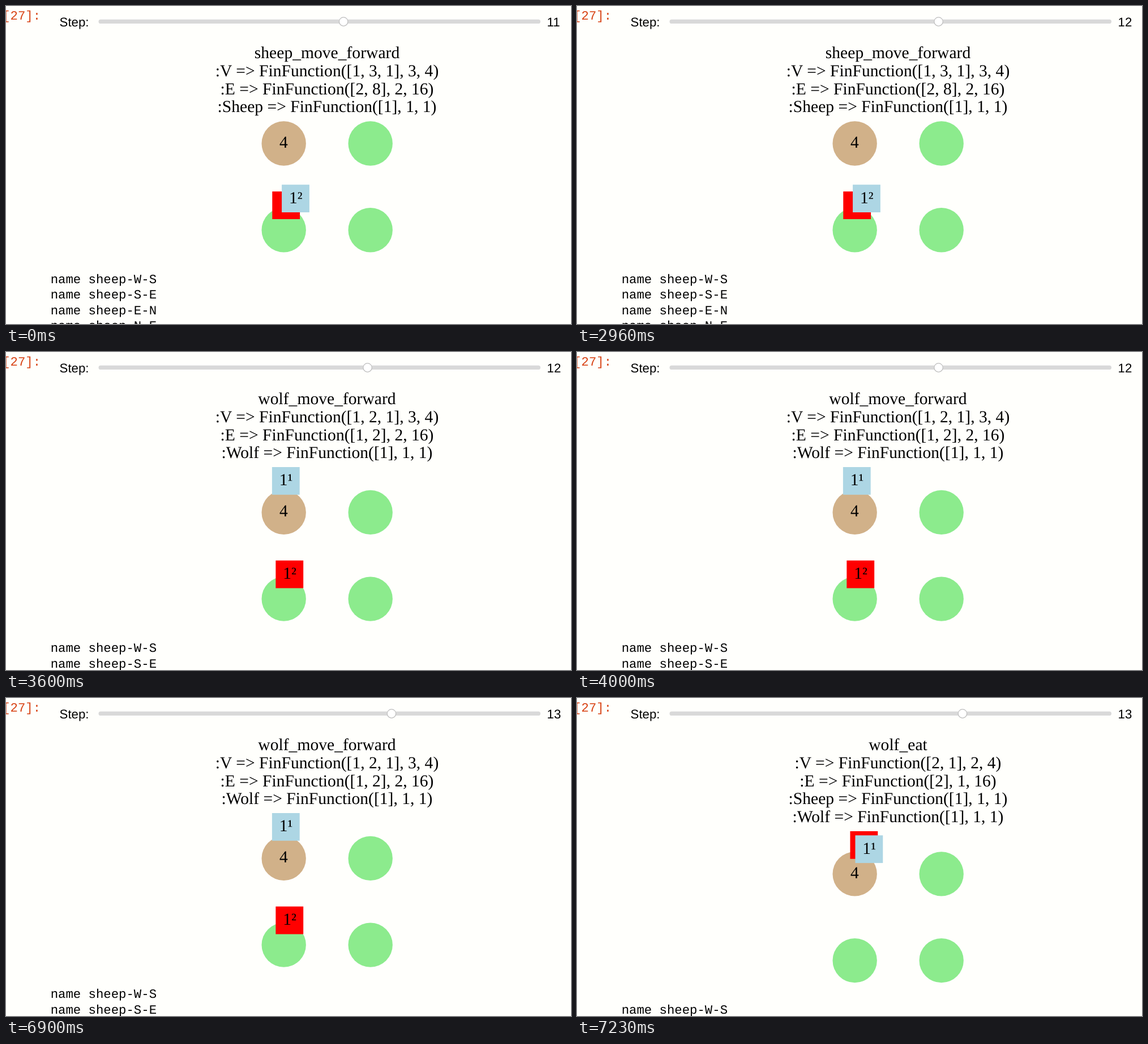
Recreate the animation shown at these times as an HTML page. Size 998x561 px, loop 8000 ms.

```html
<!DOCTYPE html>
<html lang="en">
<head>
<meta charset="utf-8">
<title>Step slider</title>
<style>
  html, body { margin: 0; width: 100%; height: 100%; overflow: hidden; background: #fffffc; }
  svg { display: block; width: 998px; height: 561px; }
  text { white-space: pre; text-rendering: geometricPrecision; }
  .sans { font: 22.2px "Liberation Sans", Arial, sans-serif; }
  .serif { font: 29.6px "Liberation Serif", Times, serif; text-anchor: middle; }
  .mono { font: 22.3px "Liberation Mono", Courier, monospace; }
</style>
</head>
<body>
<svg id="stage" viewBox="0 0 998 561"></svg>
<script>
const LOOP = 8000;
const COLORS = { grass: "#8ceb8d", soil: "#d1b189", wolf: "#ff0000", sheep: "#add6e4", ink: "#000" };
const LOG = ["W-S", "S-E", "E-N", "N-E"];
const stage = document.getElementById("stage");

function add(parent, tag, attrs) {
  const node = document.createElementNS("http://www.w3.org/2000/svg", tag);
  for (const key in attrs) node.setAttribute(key, attrs[key]);
  return parent.appendChild(node);
}

function label(parent, kind, x, y, str, fill = COLORS.ink) {
  const node = add(parent, "text", { class: kind, x, y, fill });
  node.textContent = str;
  return node;
}

// One graph: title lines, four patches, animals and the log below.
function buildScene({ lines, top, animals, logY }) {
  const g = add(stage, "g", {});
  lines.forEach((line, i) => label(g, "serif", 567, 92 + i * 31.8, line));
  for (let i = 0; i < 4; i++) {
    add(g, "circle", {
      cx: 490.7 + (i % 2) * 153, cy: top + (i >> 1) * 152.7, r: 39.2,
      fill: i ? COLORS.grass : COLORS.soil
    });
  }
  label(g, "serif", 490.5, top + 7.5, "4");
  for (const [kind, x, y, tag] of animals) {
    add(g, "rect", { x, y, width: 48.8, height: 48.8, fill: COLORS[kind] });
    label(g, "serif", x + 24.7, y + 32.3, tag);
  }
  LOG.forEach((pair, i) => label(g, "mono", 78.7, logY + i * 27.4, "name sheep-" + pair));
  return g;
}

label(stage, "mono", -5.8, 24, "[27]:", "#d84315");
label(stage, "sans", 94.6, 35.7, "Step:");
add(stage, "rect", { x: 163.5, y: 23.7, width: 780.5, height: 7.4, rx: 3.7, fill: "#d9d9d9" });
const knob = add(stage, "circle", { cy: 27.6, r: 7.7, fill: "#fff", stroke: "#bdbdbd", "stroke-width": 1.2 });
const count = label(stage, "sans", 955.6, 35.7, "");

const scenes = [
  {
    start: 0, top: 242.5, logY: 488.7,
    lines: ["sheep_move_forward", ":V => FinFunction([1, 3, 1], 3, 4)",
      ":E => FinFunction([2, 8], 2, 16)", ":Sheep => FinFunction([1], 1, 1)"],
    animals: [["wolf", 470.3, 327.2, ""], ["sheep", 487.1, 315.2, "1²"]]
  },
  {
    start: 3600, top: 282.9, logY: 529.1,
    lines: ["wolf_move_forward", ":V => FinFunction([1, 2, 1], 3, 4)",
      ":E => FinFunction([1, 2], 2, 16)", ":Wolf => FinFunction([1], 1, 1)"],
    animals: [["sheep", 469.9, 203, "1¹"], ["wolf", 476.4, 367.8, "1²"]]
  },
  {
    start: 6930, top: 310.4, logY: 556.6,
    lines: ["wolf_eat", ":V => FinFunction([2, 1], 2, 4)", ":E => FinFunction([2], 1, 16)",
      ":Sheep => FinFunction([1], 1, 1)", ":Wolf => FinFunction([1], 1, 1)"],
    animals: [["wolf", 482.5, 235, ""], ["sheep", 491.5, 242.3, "1¹"]]
  }
].map(scene => ({ start: scene.start, node: buildScene(scene) }));

const steps = [0, 2960, 6300];
const latest = (starts, t) => starts.filter(s => s <= t).length - 1;

function draw() {
  const t = performance.now() % LOOP;
  const step = latest(steps, t);
  const shown = latest(scenes.map(s => s.start), t);
  knob.setAttribute("cx", 596.2 + step * 42.4);
  count.textContent = 11 + step;
  scenes.forEach((s, i) => s.node.setAttribute("display", i === shown ? "inline" : "none"));
  requestAnimationFrame(draw);
}
draw();
</script>
</body>
</html>
```
